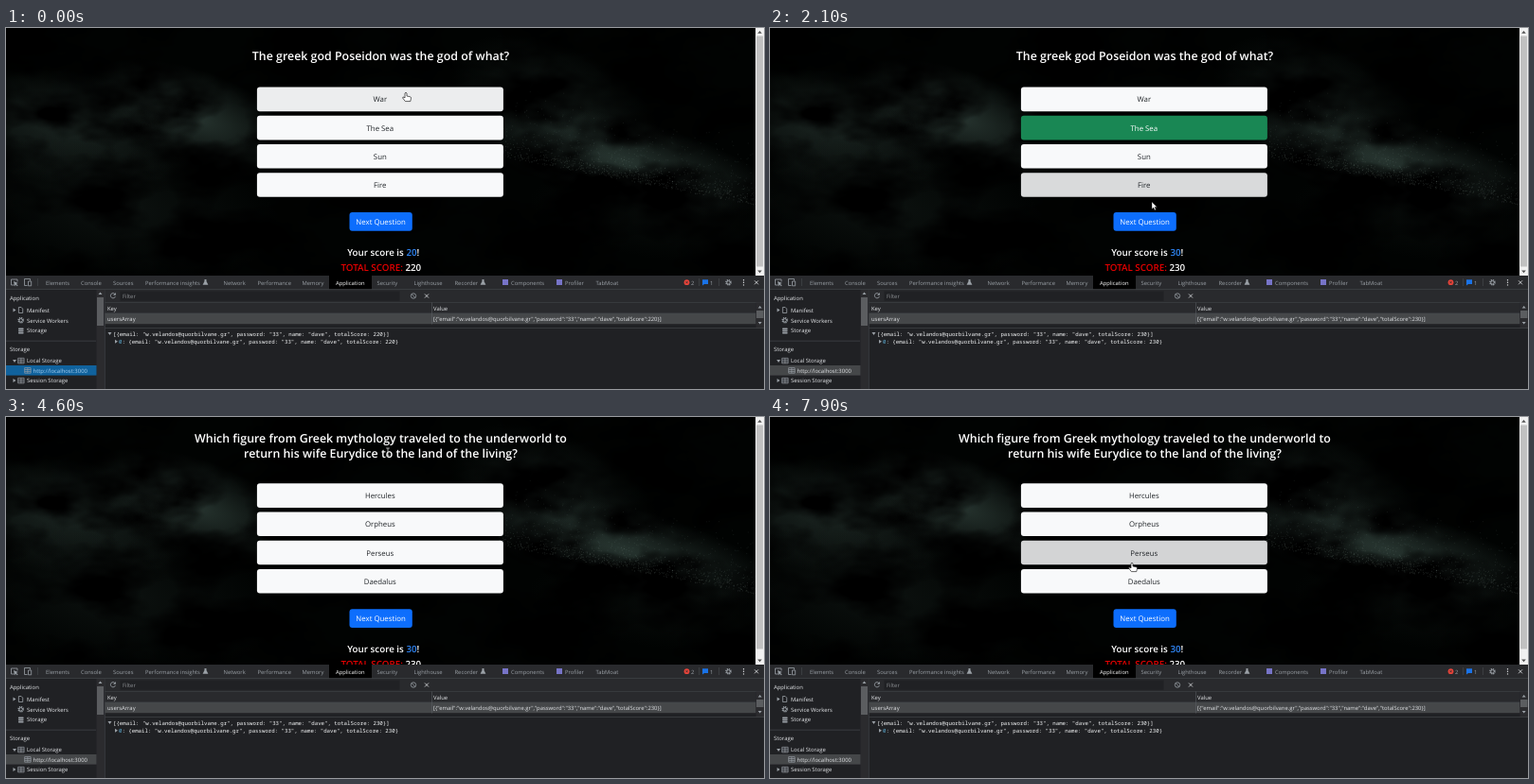
These frames come from a looping animation (800 px wide and 382 px high, 8 s). An HTML page:

```html
<!DOCTYPE html>
<html lang="en">
<head>
<meta charset="utf-8">
<title>Quiz</title>
<style>
html, body { margin: 0; height: 100%; overflow: hidden; background: #000; }
svg { display: block; width: 100%; height: 100%; text-rendering: geometricPrecision; }
text { font-family: "Open Sans", "Noto Sans", sans-serif; white-space: pre; }
.mono { font-family: "Noto Sans Mono", "DejaVu Sans Mono", monospace; font-weight: 500; }
.semi { font-weight: 600; }
.mid { text-anchor: middle; }
</style>
</head>
<body>
<svg viewBox="0 0 800 382">
  <defs>
    <radialGradient id="mist">
      <stop offset="0" stop-color="#33443e"/>
      <stop offset=".5" stop-color="#33443e" stop-opacity=".5"/>
      <stop offset="1" stop-color="#33443e" stop-opacity="0"/>
    </radialGradient>
    <filter id="shade" x="0" y="0" width="100%" height="100%" color-interpolation-filters="sRGB">
      <feTurbulence type="fractalNoise" baseFrequency=".011 .02" numOctaves="4" seed="4"/>
      <feColorMatrix values="0 0 0 0 0  0 0 0 0 0  0 0 0 0 0  3.2 0 0 0 -1.1"/>
    </filter>
    <clipPath id="view"><path d="M0 0H800V262H0Z"/></clipPath>
  </defs>
  <g id="back" clip-path="url(#view)"></g>
  <g id="page" clip-path="url(#view)"></g>
  <g id="tools"></g>
  <g id="data"></g>
  <g id="cursor"></g>
</svg>
<script>
const $ = id => document.getElementById(id);
const text = (x, y, s, size, fill, cls = '') =>
  `<text x="${x}" y="${y}" font-size="${size}" fill="${fill}" class="${cls}">${s}</text>`;
const rect = (x, y, w, h, fill, rx = 0) =>
  `<rect x="${x}" y="${y}" width="${w}" height="${h}" fill="${fill}" rx="${rx}"/>`;
const line = (d, stroke = '#9aa0a6', w = 0.8) =>
  `<path d="${d}" fill="none" stroke="${stroke}" stroke-width="${w}"/>`;
const shape = (d, fill = '#9aa0a6') => `<path d="${d}" fill="${fill}"/>`;
const dot = (x, y, r, fill) => `<circle cx="${x}" cy="${y}" r="${r}" fill="${fill}"/>`;
const mix = (a, b, k) => `rgb(${a.map((v, i) => Math.round(v + (b[i] - v) * k))})`;

// Dark, dusty backdrop
let seed = 11;
const rnd = () => (seed = (seed * 16807) % 2147483647) / 2147483647;
const bell = () => rnd() + rnd() + rnd() - 1.5;

function specks(count, place, colour) {
  let d = '';
  for (let i = 0; i < count; i++) {
    const [x, y] = place();
    d += `M${x.toFixed(1)} ${y.toFixed(1)}h.8`;
  }
  return line(d, colour, 0.8);
}

function backdrop() {
  const mist = (x, y, rx, ry, turn, opacity) =>
    `<ellipse cx="${x}" cy="${y}" rx="${rx}" ry="${ry}" fill="url(#mist)" opacity="${opacity}" transform="rotate(${turn} ${x} ${y})"/>`;
  // Dust thickens toward the lower edge of the ridge
  const ridge = depth => () => {
    const x = 520 + 270 * rnd();
    return [x, 136 + (x - 520) * 0.19 - Math.abs(bell()) * depth];
  };
  return rect(0, 0, 800, 262, '#010302') +
    mist(60, 105, 150, 60, 8, 0.5) + mist(200, 95, 120, 50, 20, 0.75) +
    mist(120, 190, 170, 75, 8, 0.22) + mist(580, 85, 120, 65, 25, 0.35) +
    mist(650, 140, 170, 45, 14, 0.75) + mist(690, 200, 140, 45, 8, 0.12) +
    '<rect width="800" height="262" filter="url(#shade)"/>' +
    specks(500, ridge(60), 'rgba(150,175,165,.16)') +
    specks(450, ridge(16), 'rgba(170,190,182,.22)');
}

// Developer tools
const GREY = '#9aa0a6', PALE = '#e3e5e8';
const gear = (x, y, c = GREY) =>
  `<circle cx="${x}" cy="${y}" r="2.5" fill="none" stroke="${c}" stroke-width="1.5" stroke-dasharray="1.2 .76"/>` +
  `<circle cx="${x}" cy="${y}" r="1.7" fill="none" stroke="${c}" stroke-width=".9"/>`;
const grid = (x, y) => line(`M${x} ${y}h6.4v5.6h-6.4zM${x} ${y + 1.9}h6.4M${x} ${y + 3.8}h6.4M${x + 3.2} ${y}v5.6`, GREY, 0.7);
const right = (x, y) => shape(`M${x} ${y - 2}l3 2-3 2z`);
const down = (x, y) => shape(`M${x} ${y - 1.3}h4l-2 3z`);
const cross = (x, y) => line(`M${x - 2} ${y - 2}l4 4m0-4l-4 4`, PALE, 0.8);
const flask = x => shape(`M${x - 1} 266h2v2l1.9 3.8h-5.8l1.9-3.8z`);

function devTools() {
  const tabs = [['Elements', 42], ['Console', 79], ['Sources', 113], ['Performance insights', 147],
    ['Network', 229.5], ['Performance', 265.5], ['Memory', 312.5], ['Application', 348], ['Security', 391.5],
    ['Lighthouse', 430.5], ['Recorder', 473.5], ['Components', 533], ['Profiler', 590], ['TabMoat', 622.5]];
  let s = rect(0, 262, 800, 120, '#202124') + rect(0, 262, 800, 14.5, '#292a2d') +
    rect(341, 262, 45, 14.5, '#000') + rect(0, 276.3, 800, 0.6, '#494c50');
  for (const [name, x] of tabs) s += text(x, 271.6, name, 5.85, name == 'Application' ? '#fff' : GREY);
  s += line('M9 272H5.5V266h6.5v2.5', GREY) + shape('M8 268l4.8 2-2 .7 1.8 1.8-.8.8-1.8-1.8-.7 1.9z') +
    line('M19.5 272.5v-7h6v2M19.5 272.5h3M23.5 268h3.2v4.8h-3.2z', GREY) +
    line('M33.5 265v8M731.5 265v8M752.5 265v8', '#494c50', 0.6) +
    flask(210.5) + flask(503.5) + rect(524, 266, 6, 6, '#7774c8') + rect(581, 266, 6, 6, '#7774c8') +
    dot(718.5, 269.2, 2.9, '#e8443a') + line('M717.4 268.1l2.2 2.2m0-2.2l-2.2 2.2', '#292a2d', 0.7) +
    text(723, 271.6, '2', 5.85, GREY) + shape('M735 266.3h6v4.6h-4l-2 1.7z', '#1a73e8') +
    text(743, 271.6, '1', 5.85, GREY) + gear(762.5, 269.3) +
    [266.7, 269.3, 271.9].map(y => dot(778.5, y, 0.7, PALE)).join('') + cross(792, 269.3);

  // Sidebar
  s += text(4, 288.3, 'Application', 5.9, PALE) + right(7.5, 298.5) + line('M13.4 295.5h2.7l1.6 1.6v4.4h-4.3z', GREY) +
    text(22, 300.7, 'Manifest', 5.9, PALE) + gear(15.7, 309.3) + text(22, 311.5, 'Service Workers', 5.9, PALE) +
    [317.4, 319.6, 321.8].map(y => rect(13, y, 5.6, 1.6, GREY, 0.6)).join('') +
    text(22, 322.2, 'Storage', 5.9, PALE) + rect(0, 330.8, 95, 0.6, '#494c50') +
    text(4, 342.2, 'Storage', 5.9, PALE) + down(7, 352.3) + grid(12.7, 349.3) +
    text(22, 354.4, 'Local Storage', 5.9, PALE) + right(7.5, 373) + grid(12.7, 370.3) +
    text(22, 375.2, 'Session Storage', 5.9, PALE) +
    rect(95.5, 277, 8, 105, '#2b2b2e') + rect(96, 285, 7, 30, '#5b5d60') +
    shape('M97.5 282l2-2.5 2 2.5z') + rect(103.8, 277, 0.7, 105, '#494c50');

  // Filter bar and table
  s += rect(104.5, 277, 695.5, 13.5, '#292a2d') +
    `<path d="M115.2 281.8a2.6 2.6 0 1 0 .2 2.4" fill="none" stroke="${GREY}" stroke-width=".9"/>` + shape('M115.8 280v2.7h-2.7z') +
    rect(120.5, 278.5, 295, 10.2, '#202124') + text(123, 285.6, 'Filter', 5.9, '#8a8d91') +
    `<circle cx="430" cy="283.5" r="2.7" fill="none" stroke="${GREY}" stroke-width=".8"/>` + line('M428.2 281.7l3.6 3.6') +
    cross(444, 283.5) + rect(104.5, 290.5, 687, 11.4, '#292a2d') + rect(104.5, 301.9, 687, 11.3, '#454749') +
    text(107, 298.6, 'Key', 5.9, PALE) + text(451, 298.6, 'Value', 5.9, PALE) +
    text(107, 309.7, 'usersArray', 5.9, PALE) + rect(104.5, 290.2, 695.5, 0.5, '#494c50') +
    rect(104.5, 301.7, 687, 0.5, '#494c50') + rect(449, 290.5, 0.5, 23, '#5f6368') +
    rect(791.5, 290.5, 8.5, 27, '#2b2b2e') + rect(792, 299, 7.5, 8, '#5b5d60') +
    shape('M793.7 296.5l2-2.5 2 2.5zM793.7 311l2 2.5 2-2.5z') + rect(104.5, 317.3, 695.5, 0.6, '#494c50') +
    down(107.5, 323.3) + right(115, 331.8);
  return s;
}

const MAIL = 'w.velandos@quorbilvane.gr';
function records(total, focused) {
  const item = `{email: "${MAIL}", password: "33", name: "dave", totalScore: ${total}}`;
  return rect(0, 357, 95.5, 10.6, focused ? '#10629d' : '#454749') + grid(19.7, 359.6) +
    text(28.5, 364.7, 'http://localhost:3000', 5.95, focused ? '#a9d0f0' : PALE) +
    text(451, 309.7, `[{"email":"${MAIL}","password":"33","name":"dave","totalScore":${total}}]`, 5.86, PALE) +
    text(113, 325.6, `[${item}]`, 5.72, '#f4f6f7', 'mono') +
    text(119, 334, `<tspan fill="#5db0d7">0</tspan>: ${item}`, 5.72, '#f4f6f7', 'mono');
}

// Pointer path: time, x, y of the hot spot
const LOOP = 8000, ANSWERED = 1255, NEXT = 2900;
const path = [[-150, 422, 40], [0, 422, 68], [500, 416, 78], [900, 404, 102], [1200, 403, 105], [1600, 403, 105],
  [1900, 403, 158], [2080, 403, 178], [2100, 403, 184], [2500, 402, 208], [3700, 402, 208], [4200, 420, 8],
  [4500, 403, 37], [4900, 403, 37], [5600, 300, 48], [6050, 327, 68], [6200, 328, 73], [6700, 328, 80],
  [7300, 350, 118], [7900, 382, 154], [8000, 383, 155]];

function pointer(t) {
  const i = Math.max(1, path.findIndex(p => p[0] >= t));
  const [a, b] = [path[i - 1], path[i]];
  const k = Math.max(0, (t - a[0]) / (b[0] - a[0]));
  return [a[1] + (b[1] - a[1]) * k, a[2] + (b[2] - a[2]) * k];
}

const inside = ([x, y], b) => x > b[0] && x < b[0] + b[2] && y > b[1] && y < b[1] + b[3];
// Share of the last 150 ms spent over the box
function hover(t, box) {
  let n = 0;
  for (let k = 0; k < 6; k++) n += inside(pointer(t - k * 25), box);
  return n / 6;
}

const quiz = [
  { title: ['The greek god Poseidon was the god of what?'], answers: ['War', 'The Sea', 'Sun', 'Fire'], shift: 0 },
  { title: ['Which figure from Greek mythology traveled to the underworld to', 'return his wife Eurydice to the land of the living?'],
    answers: ['Hercules', 'Orpheus', 'Perseus', 'Daedalus'], shift: 7.7 }
];

function drawCursor([x, y], kind) {
  const shapes = {
    hand: '<path d="M-1 1Q0-.8 1 1V4l3.6.8Q5.6 5 5.5 6.2L4.8 9.6H-.6L-3.4 6Q-3.4 4.6-2 5.2L-1 6Z" fill="#fff" stroke="#222" stroke-width=".7"/>',
    arrow: '<path d="M0 0V7.6L1.8 6 3 8.8 4.3 8.2 3.1 5.5H5.4Z" fill="#fff" stroke="#222" stroke-width=".4"/>',
    beam: '<path d="M-1.8-4h3.6M0-4V4M-1.8 4h3.6" fill="none" stroke="#ccc" stroke-width=".8"/>'
  };
  return `<g transform="translate(${x.toFixed(2)} ${y.toFixed(2)})">${shapes[kind]}</g>`;
}

function draw(t) {
  const q = quiz[+(t >= NEXT)], dy = q.shift, at = pointer(t);
  const done = t >= ANSWERED, score = done ? 30 : 20, total = done ? 230 : 220;
  const next = [362.5, 195.1 + dy * 1.07, 66.3, 19.6];
  let kind = inside(at, next) ? 'hand' : 'arrow', s = '';

  q.title.forEach((row, i) => { s += text(395.5, (dy ? 26.6 : 34.3) + i * 16, row, 12.4, '#fff', 'semi mid'); });
  q.answers.forEach((name, i) => {
    const box = [264.9, 62.6 + dy + i * 30.2, 260, 25.6];
    const correct = !dy && i == 1 ? Math.min(1, Math.max(0, (t - ANSWERED) / 150)) : 0;
    const grey = [248, 249, 250].map((v, j) => v + ([211, 212, 213][j] - v) * hover(t, box));
    if (inside(at, box)) kind = 'hand';
    s += rect(...box, mix(grey, [25, 135, 84], correct), 3) +
      text(394.8, box[1] + 15.8, name, 7.8, mix([33, 37, 41], [255, 255, 255], correct), 'mid');
  });
  if (dy && at[1] > 15 && at[1] < 48) kind = 'beam';

  s += rect(...next, mix([13, 110, 253], [11, 94, 215], hover(t, next)), 3) +
    text(395.6, next[1] + 12.9, 'Next Question', 7.85, '#fff', 'mid') +
    text(398.3, 240.8 + dy, `Your score is <tspan fill="#2f86f6">${score}</tspan>!`, 9.8, '#fff', 'semi mid') +
    text(395.8, 257.3 + dy, `<tspan fill="#e60000">TOTAL SCORE:</tspan> ${total}`, 9.8, '#fff', 'semi mid') +
    rect(791, 0, 9, 262, '#f1f1f1') + rect(792, 8.5, 7, dy ? 237 : 244, '#c1c1c1') +
    shape('M793.2 5.7l2.3-2.7 2.3 2.7zM793.2 256.5l2.3 2.7 2.3-2.7z', '#505050');

  $('page').innerHTML = s;
  $('data').innerHTML = records(total, !done);
  $('cursor').innerHTML = drawCursor(at, kind);
}

$('back').innerHTML = backdrop();
$('tools').innerHTML = devTools();

const start = performance.now();
let shown = -1;
function tick(now) {
  // The screen refreshes ten times a second
  const t = Math.floor((Math.max(0, now - start) % LOOP) / 100) * 100;
  if (t != shown) draw(shown = t);
  requestAnimationFrame(tick);
}
tick(start);
</script>
</body>
</html>
```
